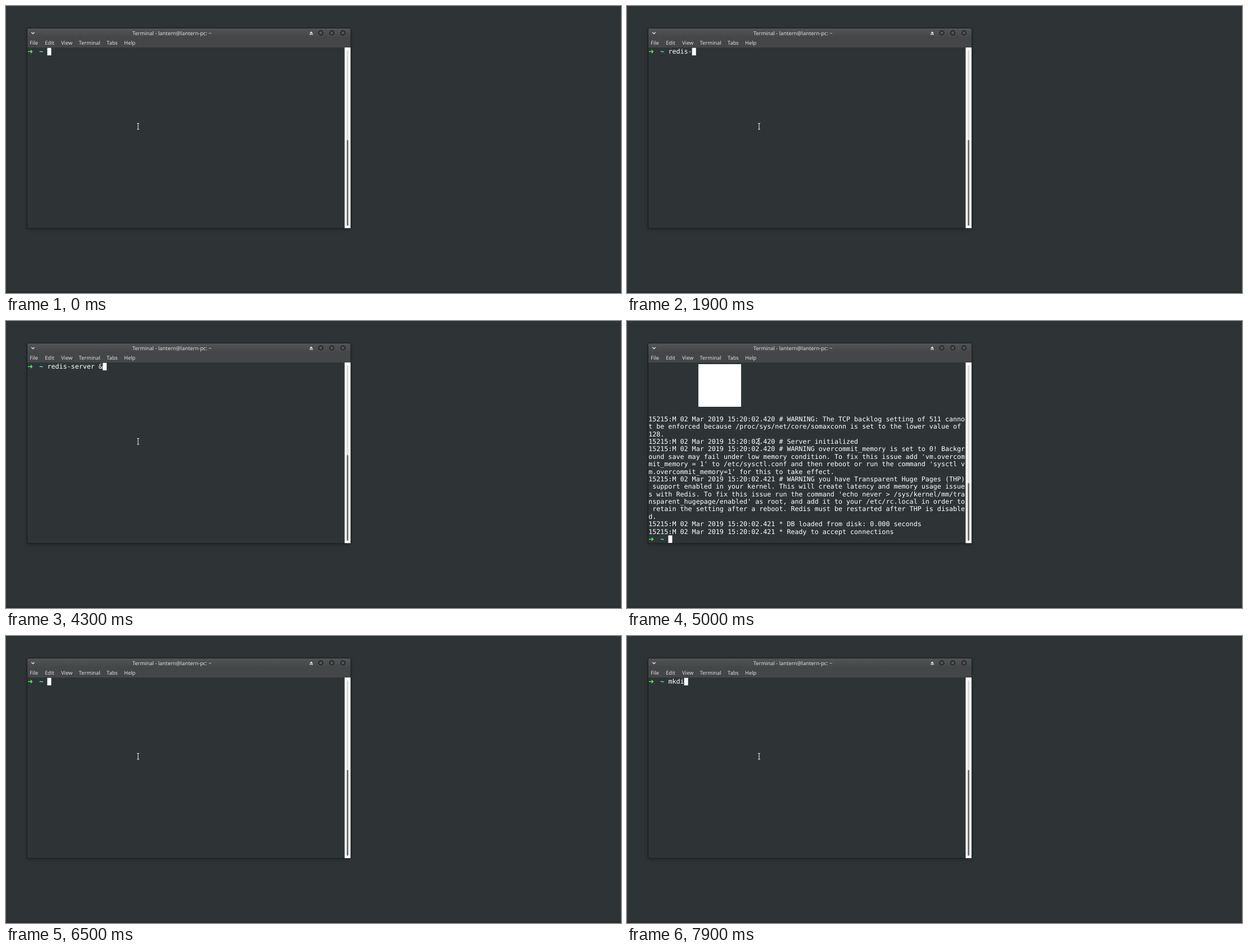
Recreate the animation shown at these times as an HTML page. Size 1094 px wide and 512 px high, loop 8000 ms.

```html
<!DOCTYPE html>
<html lang="en">
<head>
<meta charset="utf-8">
<title>Terminal</title>
<style>
html, body { margin: 0; width: 100%; height: 100%; overflow: hidden; background: #2e3436; }
svg { display: block; }
text { white-space: pre; text-rendering: geometricPrecision; }
.ui { font: 9.3px "Noto Sans", sans-serif; fill: #dcdedf; }
.mono { font: 11.7px "DejaVu Sans Mono", monospace; fill: #fff; }
.arrow { font: bold 11.7px "DejaVu Sans", sans-serif; fill: #4fff4f; }
.tilde { font-weight: bold; fill: #55f0f5; }
</style>
</head>
<body>
<svg width="1094" height="512" viewBox="0 0 1094 512">
  <defs>
    <linearGradient id="bar" x1="0" y1="0" x2="0" y2="1">
      <stop offset="0" stop-color="#525456"/>
      <stop offset="1" stop-color="#434547"/>
    </linearGradient>
    <linearGradient id="edge" x1="0" y1="0" x2="0" y2="1">
      <stop offset="0" stop-color="#2e3436"/>
      <stop offset="1" stop-color="#262b2d"/>
    </linearGradient>
    <filter id="soft" x="-5%" y="-5%" width="110%" height="112%">
      <feGaussianBlur stdDeviation="3"/>
    </filter>
  </defs>
  <rect width="1094" height="512" fill="#2e3436"/>
  <rect y="508" width="1094" height="4" fill="url(#edge)"/>

  <rect x="37.5" y="42" width="575.5" height="356.5" fill="#000" opacity=".35" filter="url(#soft)"/>
  <path d="M37.1 397.1V42q0-2.8 2.8-2.8H610.8q2.8 0 2.8 2.8V397.1Z" fill="#15191a"/>
  <path d="M37.9 57V42q0-2 2-2H610.9q2 0 2 2V57Z" fill="url(#bar)"/>
  <rect x="37.9" y="57" width="575" height="17" fill="#444648"/>
  <rect x="37.9" y="74" width="565" height="322.3" fill="#2e3436"/>

  <path d="M45.3 46.9L48 49.6L50.7 46.9" fill="none" stroke="#e4e5e6" stroke-width="1.4"/>
  <path d="M540 49L543 45.2L546 49ZM540 50H546V51.3H540Z" fill="#e4e5e6"/>
  <g id="buttons" fill="#505254" stroke="#17191a" stroke-width="1.4"></g>
  <text class="ui" x="295.2" y="52" text-anchor="middle">Terminal - lantern@lantern-pc: ~</text>
  <g id="menu" class="ui"></g>

  <rect x="602.4" y="74" width="10.5" height="322.3" fill="#fbfbfb"/>
  <rect x="606.2" y="79" width="2.8" height="313" rx="1.4" fill="#d8dada"/>
  <rect id="thumb" x="606.2" width="2.8" rx="1.4" fill="#6a6d6e"/>

  <g id="output">
    <rect x="127" y="77" width="76" height="76" fill="#fff"/>
  </g>
  <g id="prompt">
    <text class="arrow" x="38.2" y="85.2">➜</text>
    <text class="mono tilde" x="59.3" y="85.2">~</text>
    <text id="typed" class="mono" x="73.4" y="85.2"></text>
    <rect id="cursor" y="74.7" width="7.04" height="13.38" fill="#fff"/>
  </g>
  <path d="M233 209.5H234.5L235 210L235.5 209.5H237M235 210V219.5M233 220H234.5L235 219.5L235.5 220H237"
        fill="none" stroke="#e6e8e8" stroke-width="1.1"/>
</svg>
<script>
const LOOP = 8000, COLS = 80, CELL = 7.044, ROW = 13.383, LEFT = 38.2, BASE = 85.2;
const $ = id => document.getElementById(id);

function add(parent, tag, attrs, content = "") {
  const el = document.createElementNS("http://www.w3.org/2000/svg", tag);
  for (const key in attrs) el.setAttribute(key, attrs[key]);
  el.textContent = content;
  parent.appendChild(el);
}

for (const cx of [560, 579.6, 599.4]) add($("buttons"), "circle", { cx, cy: 47.9, r: 3.7 });

const menu = { File: 42.2, Edit: 69.2, View: 98, Terminal: 129.6, Tabs: 179, Help: 210.1 };
for (const name in menu) add($("menu"), "text", { x: menu[name], y: 69.2 }, name);

const stamp = ms => "15215:M 02 Mar 2019 15:20:02." + ms;
const log = [
  stamp(420) + " # WARNING: The TCP backlog setting of 511 cannot be enforced because /proc/sys/net/core/somaxconn is set to the lower value of 128.",
  stamp(420) + " # Server initialized",
  stamp(420) + " # WARNING overcommit_memory is set to 0! Background save may fail under low memory condition. To fix this issue add 'vm.overcommit_memory = 1' to /etc/sysctl.conf and then reboot or run the command 'sysctl vm.overcommit_memory=1' for this to take effect.",
  stamp(421) + " # WARNING you have Transparent Huge Pages (THP) support enabled in your kernel. This will create latency and memory usage issues with Redis. To fix this issue run the command 'echo never > /sys/kernel/mm/transparent_hugepage/enabled' as root, and add it to your /etc/rc.local in order to retain the setting after a reboot. Redis must be restarted after THP is disabled.",
  stamp(421) + " * DB loaded from disk: 0.000 seconds",
  stamp(421) + " * Ready to accept connections"
];

// Wrap at the terminal width; the log begins on the eighth row.
let row = 7;
for (const line of log) {
  for (let i = 0; i < line.length; i += COLS) {
    add($("output"), "text", { class: "mono", x: LEFT, y: BASE + ROW * row++ }, line.slice(i, i + COLS));
  }
}

// Each entry: time, command, number of characters typed so far.
const server = "redis-server &";
const keys = [
  [0, server, 0], [500, server, 1], [700, server, 2], [1000, server, 3],
  [1100, server, 4], [1300, server, 5], [1900, server, 6], [2100, server, 7],
  [2200, server, 8], [2400, server, 9], [2900, server, 13], [4300, server, 14],
  [5000, "clear", 0], [6000, "clear", 2], [6300, "clear", 4],
  [6500, "mkdir", 0], [7300, "mkdir", 2], [7600, "mkdir", 3], [7900, "mkdir", 4]
];

function draw(t) {
  const [, command, count] = keys.filter(key => key[0] <= t).pop();
  const full = t >= 5000 && t < 6500;
  const top = full ? 289 : 239;
  $("typed").textContent = command.slice(0, count);
  $("cursor").setAttribute("x", LEFT + CELL * (5 + count));
  $("prompt").setAttribute("transform", `translate(0 ${full ? ROW * 23 : 0})`);
  $("output").setAttribute("visibility", full ? "visible" : "hidden");
  $("thumb").setAttribute("y", top);
  $("thumb").setAttribute("height", 392 - top);
}

const start = performance.now();
function tick() {
  draw((performance.now() - start) % LOOP);
  requestAnimationFrame(tick);
}
tick();
</script>
</body>
</html>
```
